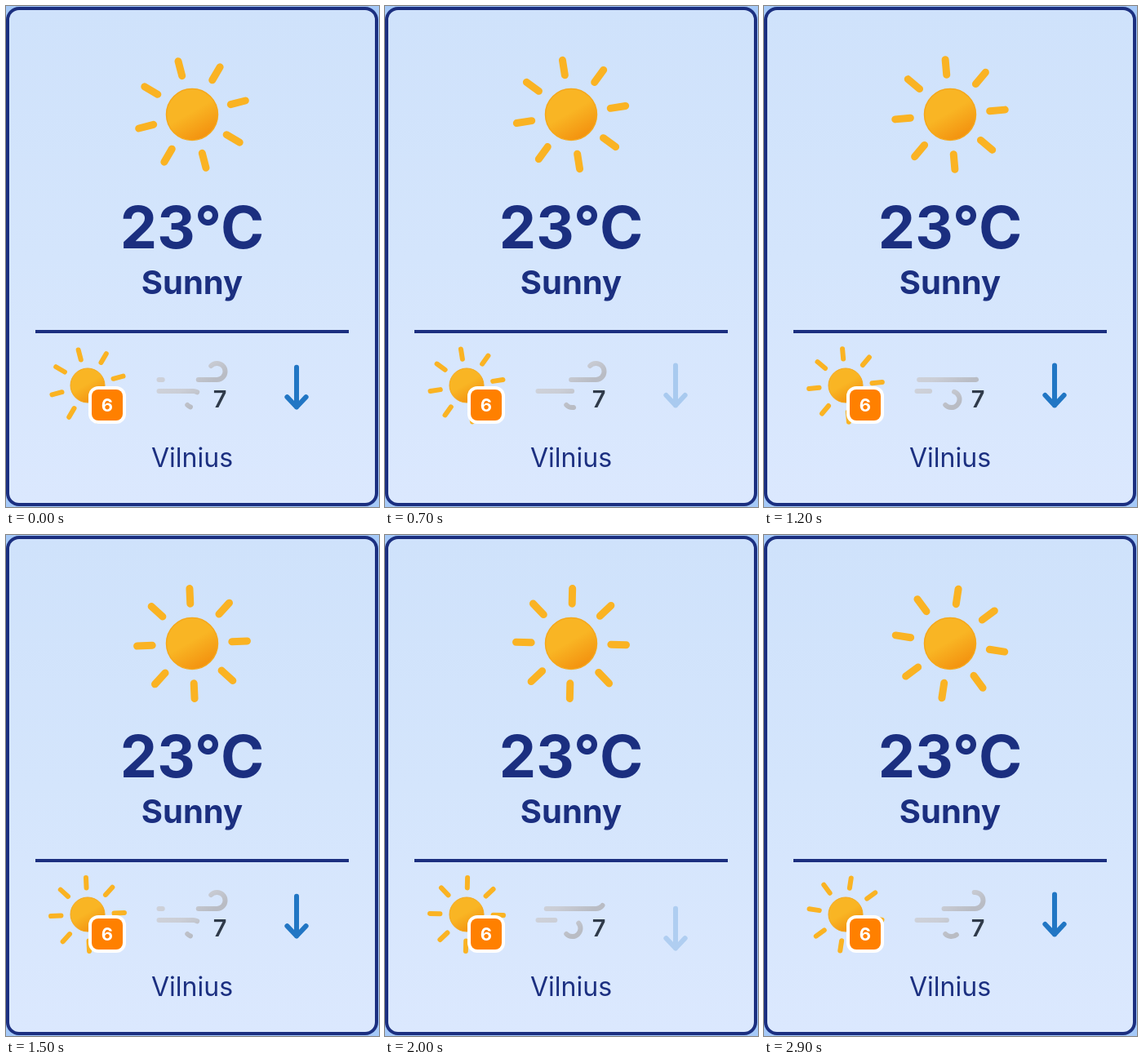
These frames come from a looping animation (457 px wide and 614 px high, 3000 ms). An HTML page with a canvas:

```html
<!DOCTYPE html>
<html lang="en">
<head>
<meta charset="utf-8">
<title>Weather card</title>
<style>
  html, body { margin: 0; width: 100%; height: 100%; overflow: hidden; background: #a5c9f8; }
  canvas { display: block; width: 457px; height: 614px; }
</style>
</head>
<body>
<canvas id="stage"></canvas>
<script>
const W = 457, H = 614, LOOP = 3000, STEP = 100;
const NAVY = '#1b2f80', RAY = '#fab323', BLUE = '#2176c4';
const canvas = document.getElementById('stage');
const ctx = canvas.getContext('2d');
const ratio = window.devicePixelRatio || 1;
canvas.width = W * ratio;
canvas.height = H * ratio;

const clamp01 = x => Math.min(1, Math.max(0, x));

function gradient(x1, y1, x2, y2, stops) {
  const g = ctx.createLinearGradient(x1, y1, x2, y2);
  stops.forEach(([at, color]) => g.addColorStop(at, color));
  return g;
}

function roundRect(x, y, w, h, r, fill) {
  ctx.beginPath();
  ctx.roundRect(x, y, w, h, r);
  ctx.fillStyle = fill;
  ctx.fill();
}

function text(str, x, y, weight, size, color) {
  ctx.font = `${weight} ${size}px Inter, sans-serif`;
  ctx.textAlign = 'center';
  ctx.fillStyle = color;
  ctx.fillText(str, x, y);
}

// Icons are drawn in units of a 64 x 64 box centred on (cx, cy).
function icon(cx, cy, scale, draw) {
  ctx.save();
  ctx.translate(cx, cy);
  ctx.scale(scale, scale);
  ctx.lineWidth = 3;
  ctx.lineCap = ctx.lineJoin = 'round';
  draw();
  ctx.restore();
}

function sun(t) {
  const turn = (8 * t - 14.6) * Math.PI / 180;
  ctx.strokeStyle = RAY;
  ctx.beginPath();
  for (let i = 0; i < 8; i++) {
    const a = turn + i * Math.PI / 4, c = Math.cos(a), s = Math.sin(a);
    ctx.moveTo(16.29 * c, 16.29 * s);
    ctx.lineTo(22.5 * c, 22.5 * s);
  }
  ctx.stroke();
  ctx.beginPath();
  ctx.arc(0, 0, 10.5, 0, 2 * Math.PI);
  ctx.fillStyle = gradient(-5.25, -9.09, 5.25, 9.09,
    [[0, '#f9b524'], [0.45, '#f9b524'], [1, '#f3920f']]);
  ctx.fill();
  ctx.lineWidth = 0.5;
  ctx.strokeStyle = '#f5a81c';
  ctx.stroke();
}

// A gust: a hook of radius 5 that runs into a straight tail to the left.
function gust(x, y, side, dash, offset) {
  const curl = Math.atan2(3.46, 3.61);
  ctx.strokeStyle = gradient(x - 19, y - 10, x - 8, y + 9,
    [[0, '#cfd2da'], [0.45, '#cbced6'], [1, '#b9bcc4']]);
  ctx.setLineDash(dash);
  ctx.lineDashOffset = offset;
  ctx.beginPath();
  ctx.arc(x, y, 5, side * (Math.PI + curl), side * Math.PI / 2, side < 0);
  ctx.lineTo(-20.25, y + side * 5);
  ctx.stroke();
}

function wind(t) {
  gust(15.25, -8.54, 1, [35, 22], 4 + 76 * t);
  gust(0.75, 8.54, -1, [24, 15], 21.8 + 52 * t);
}

function arrow(t) {
  const p = (t + 0.07) % 1.5;
  const falling = p < 0.6;
  const y = falling ? 15 * p : 0;
  ctx.globalAlpha = falling ? clamp01((0.6 - p) / 0.135) : clamp01((p - 0.6) / 0.67);
  ctx.strokeStyle = BLUE;
  ctx.beginPath();
  ctx.moveTo(0, y - 12.2);
  ctx.lineTo(0, y + 12.2);
  ctx.moveTo(-5.8, y + 6);
  ctx.lineTo(0, y + 12.2);
  ctx.lineTo(5.8, y + 6);
  ctx.stroke();
}

function card() {
  ctx.fillStyle = '#a5c9f8';
  ctx.fillRect(0, 0, W, H);
  roundRect(0, 1, 456, 612, 16, NAVY);
  roundRect(4, 5, 448, 604, 12, gradient(0, 5, 0, 609,
    [[0, '#cfe2fb'], [0.5, '#d4e5fc'], [1, '#dbe8fe']]));
  ctx.fillStyle = NAVY;
  ctx.fillRect(36, 397, 384, 4);
  text('23°C', 228, 297, 700, 72, NAVY);
  text('Sunny', 228, 353, 700, 40, NAVY);
  text('Vilnius', 228, 565, 400, 32, NAVY);
}

function render(t) {
  ctx.setTransform(ratio, 0, 0, ratio, 0, 0);
  card();
  icon(228, 133, 3, () => sun(t));
  icon(100, 465, 2, () => sun(t));
  roundRect(101, 466, 46, 46, 12, '#fff');
  roundRect(105, 470, 38, 38, 8, '#ff8000');
  text('6', 124, 497, 700, 22, '#fff');
  icon(228, 465, 2, () => wind(t));
  text('7', 262, 492, 600, 29, '#2f3a4a');
  icon(356, 465, 2, () => arrow(t));
}

function tick() {
  const ms = performance.now() % LOOP;
  render(Math.floor(ms / STEP) * STEP / 1000);
  requestAnimationFrame(tick);
}
tick();
</script>
</body>
</html>
```
